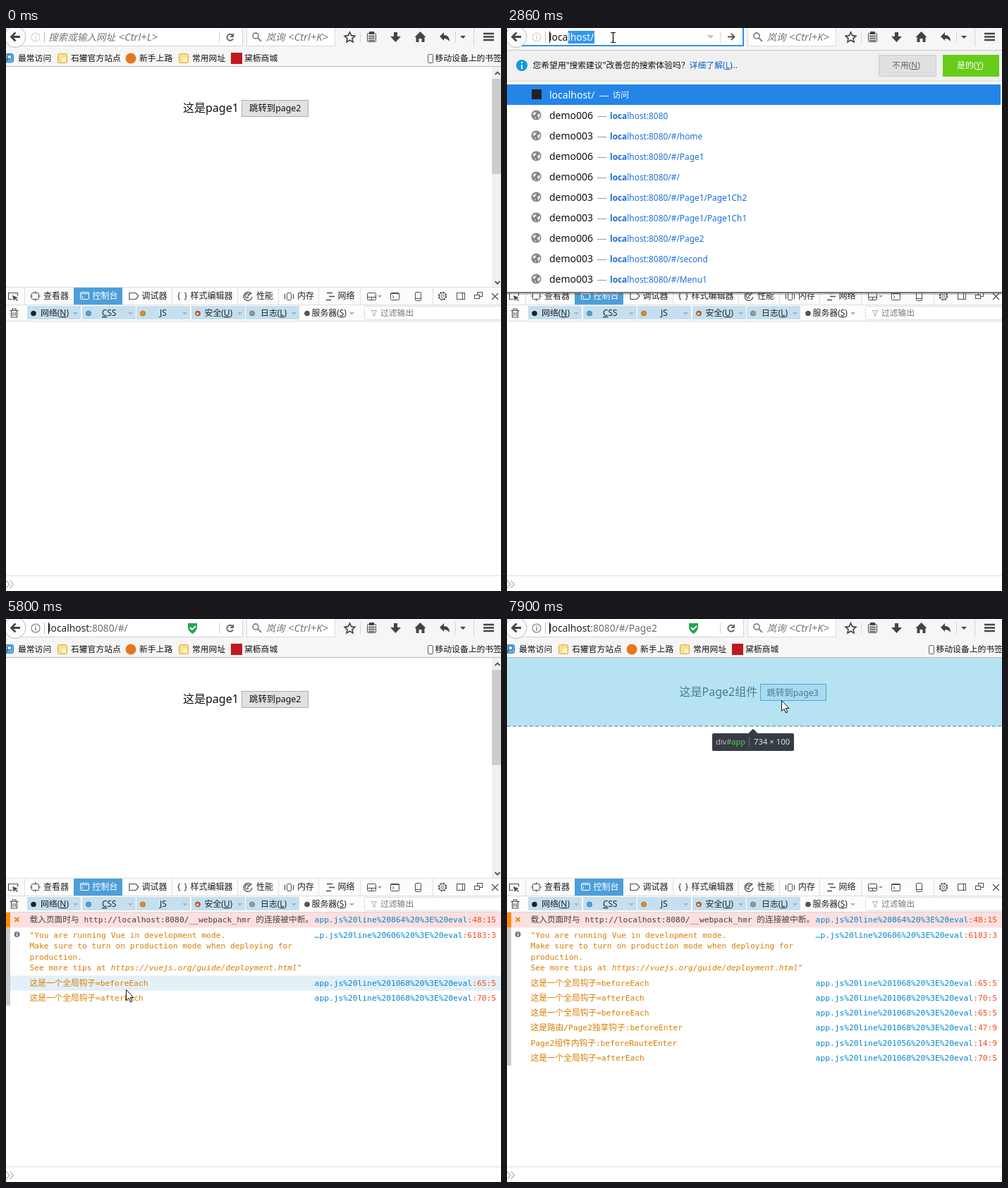
Write an HTML page that moves like this. It is 702 by 798 pixels and loops after 8000 ms.

```html
<!DOCTYPE html>
<html lang="zh-CN">
<head>
<meta charset="utf-8">
<style>
html, body { margin: 0; width: 100%; height: 100%; overflow: hidden; background: #fff }
svg { display: block; font-family: 'Noto Sans', 'Open Sans', 'Noto Sans CJK SC', 'Noto Sans CJK', sans-serif }
text { white-space: pre }
.mono { font-family: 'DejaVu Sans Mono', 'Noto Sans CJK SC', 'Noto Sans CJK', monospace }
</style>
</head>
<body>
<svg width="702" height="798" viewBox="0 0 702 798"><g id="base"></g><g id="live"></g></svg>
<script>
const LOOP = 8000;
const esc = s => s.replace(/&/g, '&amp;').replace(/</g, '&lt;');
const rect = (x, y, w, h, fill, extra = '') => `<rect x="${x}" y="${y}" width="${w}" height="${h}" fill="${fill}" ${extra}/>`;
const box = (x, y, w, h, fill, line, r = 0) => rect(x + .5, y + .5, w - 1, h - 1, fill, `stroke="${line}" rx="${r}"`);
const disc = (x, y, r, fill, extra = '') => `<circle cx="${x}" cy="${y}" r="${r}" fill="${fill}" ${extra}/>`;
const path = (d, stroke, w = 1, fill = 'none') => `<path d="${d}" stroke="${stroke}" stroke-width="${w}" fill="${fill}"/>`;
const fillPath = (d, fill) => `<path d="${d}" fill="${fill}"/>`;
// baselines sit on whole pixels to keep the text crisp
const raw = (x, y, body, size = 11.8, fill = '#222', extra = '') => `<text x="${x}" y="${Math.floor(y)}" font-size="${size}" fill="${fill}" ${extra}>${body}</text>`;
const text = (x, y, s, ...rest) => raw(x, y, esc(s), ...rest);
const span = (s, attrs) => `<tspan ${attrs}>${esc(s)}</tspan>`;
const vline = (x, y, h, c = '#d4d4d4') => rect(x, y, 1, h, c);
const caretDown = (x, y, w, fill) => fillPath(`M${x - w} ${y}h${2 * w}l${-w} ${w}z`, fill);
const cjk = s => esc(s).replace(/[\u3000-\u9fff]+/g, m => `<tspan font-size="11.7">${m}</tspan>`);
const hint = (x, label, keyX, keys) => text(x, 18, label, 13.6, '#777', 'font-style="italic"')
  + text(keyX, 18, keys, 14.8, '#777', 'font-style="italic"');

function toolbar() {
  const ink = '#444';
  const folder = x => box(x, 36, 14, 14, '#fbe08a', '#d9a93c', 2) + rect(x + 6, 42, 6, 6, '#fff3c4');
  return rect(0, 0, 702, 54, '#f6f6f6') + rect(0, 54, 702, 1, '#b9b9b9')
    + box(341, -2, 126, 28, '#fff', '#dadada')
    + disc(354, 11, 4, 'none', 'stroke="#8a8a8a" stroke-width="1.8"') + path('M357 14l5 5', '#8a8a8a', 2.2)
    + hint(368.5, '岚询', 400, '<Ctrl+K>')
    + path('M487.5 6l2.2 4.7 5.1.6-3.8 3.5 1 5.1-4.5-2.6-4.5 2.6 1-5.1-3.8-3.5 5.1-.6z', ink, 1.7)
    + vline(502, 5, 16) + box(512, 7, 13, 13, 'none', ink, 1) + rect(515, 5, 7, 4, ink)
    + path('M514 11.5h9M514 14.5h9M514 17.5h9', ink, 1.3)
    + fillPath('M550 6h5v6h5l-7.5 8-7.5-8h5z', ink)
    + fillPath('M587.5 5l8 8h-2v7h-4v-5h-4v5h-4v-7h-2z', ink)
    + fillPath('M615 12l6-6v4q8 0 8 9q-3-4-8-4v3z', ink)
    + vline(637, 5, 16) + caretDown(648, 11, 4, ink) + vline(663, 0, 26)
    + path('M677 8h15M677 12.5h15M677 17h15', ink, 2.6)
    + box(-3, 36, 14, 13, '#63aee8', '#2f7fc4', 2) + disc(5, 41, 3, '#dff0ff', 'stroke="#245d94"') + path('M3 43l-3 4', '#245d94', 1.5)
    + folder(73) + folder(245) + disc(177, 43, 7.5, '#e8761c') + rect(319, 35, 16, 16, '#c1191f')
    + [[17, '最常访问'], [92, '石獾官方站点'], [189, '新手上路'], [264, '常用网址'], [338, '黛枥商城'], [608.5, '移动设备上的书签']]
      .map(([x, s]) => text(x, 47, s, 11.8, '#111')).join('')
    + box(598, 37, 8, 13, '#e8e8e8', '#666', 1) + rect(600, 39, 4, 8, '#fff');
}

function devtools() {
  const ink = '#4a4d52';
  const tabs = [[53, '查看器'], [122.5, '控制台'], [192.5, '调试器'], [261.5, '样式编辑器'], [355, '性能'], [413, '内存'], [470.5, '网络']];
  const filters = [[30, 49, '网络', 'N', '#222'], [108, 136, 'CSS', '', '#47a3e6'], [185, 218, 'JS', '', '#e88a22'],
    [263, 281.5, '安全', 'U', '#dd5a2a'], [340, 361, '日志', 'L', '#999'], [418, 433.5, '服务器', 'S', '#555']];
  const under = s => span(s, 'text-decoration="underline"');
  return rect(0, 367, 702, 49, '#fcfcfc') + rect(0, 367, 702, 1, '#e0e0e0') + rect(0, 392, 702, 1, '#dcdcdc') + rect(0, 415, 702, 1, '#d8d8d8')
    + rect(96, 368, 69, 24, '#4c9ed9')
    + [26, 235, 328, 386, 443, 502, 605].map(x => vline(x, 368, 24, '#e0e0e0')).join('')
    + tabs.map(([x, s], i) => text(x, 384, s, 12, i == 1 ? '#fff' : '#222')).join('')
    + path('M9 384.5h-5.5v-9h13v4', ink, 1.2) + fillPath('M9 379l8 3-3 1 3 3-1 1-3-3-2 3z', ink)
    + box(36, 375, 11, 10, 'none', ink, 1) + path('M41.5 373v3M41.5 384v3M34 380h3M46 380h3', ink)
    + box(105, 374, 13, 11, 'none', '#fff', 1) + path('M105 376.5h13M107 379l2 2-2 2', '#fff')
    + path('M175 375.5h9l4 4.5-4 4.5h-9z', ink, 1.2)
    + path('M247 375q-2 0-2 2v2l-1 1 1 1v2q0 2 2 2M253 375q2 0 2 2v2l1 1-1 1v2q0 2-2 2', ink, 1.2)
    + path('M348 377a6 6 0 1 0 1 4M345 379a3 3 0 1 0-1 3M342 381l6-6', ink, 1.2)
    + box(398, 375, 7, 11, 'none', ink, 1) + path('M395.5 377v7M407.5 377v7', ink, 1.2)
    + path('M455 375.5h8M458 380.5h8M454 385.5h7', ink, 1.3)
    + box(512, 375, 13, 11, 'none', ink, 1) + path('M512 381.5h13M518.5 381v5', ink) + caretDown(530, 379, 3, '#999')
    + box(545, 375, 13, 11, 'none', ink, 1) + path('M545 376.5h13M548 379l2 2-2 2', ink)
    + box(580, 374, 9, 13, 'none', ink, 1) + path('M580 383.5h9', ink)
    + disc(619, 380, 5, 'none', `stroke="${ink}" stroke-width="2.5" stroke-dasharray="2.4 1.5"`) + disc(619, 380, 4.5, '#fcfcfc', 'stroke="#666"') + disc(619, 380, 2, 'none', 'stroke="#666"')
    + box(639, 375, 12, 10, 'none', ink) + vline(647, 375, 10, ink)
    + box(668, 374, 8, 7, 'none', ink) + box(664, 378, 8, 6, '#fcfcfc', ink)
    + path('M689 376l9 9M698 376l-9 9', ink, 1.2)
    + path('M5.5 400.5h12M9 400v-2h5v2M7.5 401v9h8v-9M10 403v5M13 403v5', ink, 1.2)
    + filters.map(([x, tx, s, key, dot], i) => (i < 5 ? rect(x, 394, 76, 19, '#c4dfef') : '')
      + disc(x + 9, 404.5, 3.6, dot, 'stroke="#000" stroke-opacity=".3"') + caretDown(x + (i < 5 ? 68.5 : 72.5), 403, 3.5, '#a5b2ba')
      + raw(tx, 408, key ? `${s}(${under(key)})` : under(s[0]) + s.slice(1), 11.9)).join('')
    + disc(271.5, 405, 1.6, '#fff0d0')
    + box(508, 394, 196, 20, '#fff', '#ddd', 2) + path('M518.5 400.5h7l-2.5 4v4l-2-1v-3z', '#aaa') + text(531, 408, '过滤输出', 11.8, '#777')
    + rect(0, 416, 702, 382, '#fff') + rect(0, 776, 702, 1, '#dedede')
    + path('M0 783l5 5.5-5 5.5M5.5 783l5 5.5-5 5.5', '#b5b5b5', 1.2);
}

function addressBar(t) {
  const focus = t >= 1230 && t < 3780, strong = t >= 1300 && t < 3700, loaded = t >= 4010, typed = t >= 2310;
  let s = rect(20, 0, 316, 26, '#f6f6f6') + box(20, -2, 316, 28, '#fff', strong ? '#2f91e5' : focus ? '#86bdea' : '#d2d2d2')
    + (strong ? rect(20, 24, 315, 1, '#2f91e5') + rect(334, 0, 1, 25, '#2f91e5') : '')
    + disc(13, 12.5, 15, '#fbfbfb', 'stroke="#b9b9b9"') + path('M20 12.5h-12M13.5 6.5l-6 6 6 6', '#444', 2.8);
  const tone = loaded ? '#777' : '#d0d0d0';
  s += disc(42, 13, 6, 'none', `stroke="${tone}" stroke-width="1.1"`) + rect(41.3, 12, 1.4, 4.5, tone) + rect(41.3, 9.5, 1.4, 1.5, tone)
    + vline(54, 5, 16, '#bbb') + vline(302, 5, 16);
  if (!typed) s += hint(60, '搜索或输入网址', 159.5, '<Ctrl+L>');
  else if (t < 3240) {
    const n = t < 2550 ? 1 : t < 2700 ? 2 : t < 2780 ? 3 : 4, x = [0, 63.6, 72, 78.8, 86.6][n];
    s += rect(x, 4, 124 - x, 18, '#3297f0') + raw(60, 18, span('localhost/'.slice(0, n), 'fill="#111"') + span('localhost/'.slice(n), 'fill="#fff"'), 13.8);
  } else {
    const tail = t < 4010 ? ':8080' : t < 7820 ? ':8080/#/' : ':8080/#/Page2';
    s += raw(60, 18, span('localhost', 'fill="#222"') + span(tail, 'fill="#707070"'), 13.8);
  }
  if (t >= 1230) s += vline(60, 5, 16, '#000');
  if (focus || (typed && !loaded)) s += caretDown(288.5, 10, 5, '#c4c4c4');
  if (loaded) s += fillPath('M258 6h13v6q-1 6-6.5 9q-5.5-3-6.5-9z', '#23a455') + path('M261 12l3 3 5-5', '#fff', 1.8);
  if (typed && t < 3700) s += path('M313 12.5h9M318 8l4.5 4.5-4.5 4.5', '#555', 1.8);
  else if (typed && !loaded) s += path('M314 9l8 8M322 9l-8 8', '#666', 2);
  else s += path('M321 10a4.5 4.5 0 1 0 1 5', '#666', 1.9) + fillPath('M323 7v6h-6z', '#666');
  return s;
}

function page(t) {
  if (t >= 7820) return page2(t >= 7900);
  const look = t >= 7660 ? ['#cce4f7', '#005499'] : t >= 7190 ? ['#e5f1fb', '#0078d7'] : ['#e1e1e1', '#adadad'];
  return rect(0, 55, 702, 312, '#fff') + text(251, 119, '这是page1', 16, '#111')
    + box(334, 102, 95, 24, ...look) + text(345, 118, '跳转到page2', 12.4, '#111')
    + rect(689, 55, 13, 312, '#f0f0f0') + rect(689, 72, 13, 135, '#cdcdcd')
    + path('M693.5 66l3.5-3.5 3.5 3.5M693.5 359l3.5 3.5 3.5-3.5', '#555', 1.8)
    + (t >= 3700 && t < 4010 ? box(-2, 347, 218, 22, '#ececec', '#b5b5b5') + text(-2, 362, '等待 localhost...', 11.8) : '');
}

function page2(lit) {
  const ink = lit ? '#467d94' : '#111';
  return rect(0, 55, 702, 312, '#fff') + (lit ? rect(0, 55, 702, 97, '#b7e2f1') : '')
    + text(244.5, 109, '这是Page2组件', 16, ink)
    + box(359, 92, 94, 24, lit ? '#a9daf0' : '#e5f1fb', lit ? '#4aa9de' : '#0078d7') + text(368.5, 109, '跳转到page3', 12.4, ink)
    + (!lit ? '' : `<path d="M0 152h702" stroke="#48819b" stroke-dasharray="5 3"/>`
      + rect(291, 162, 116, 25, '#363c46', 'rx="2"') + fillPath('M342 162.5l7-7 7 7z', '#363c46')
      + raw(296, 178, span('div', 'fill="#e3a9dc"') + span('#app', 'fill="#5ecb4e"'), 11)
      + vline(343, 167, 14, '#6a717c') + text(350, 178, '734 × 100', 11.3, '#e4e7ea'));
}

const SRC = 'app.js%20line%20';
const link = (y, id, place, head = SRC) => raw(695, y,
  span(`${head}${id}%20%3E%20eval`, 'fill="#0087ca"') + span(place, 'fill="#ee4b1c"'), 11.25, '#000', 'class="mono" text-anchor="end"');
const log = (x, y, s, color = '#d97e00') => raw(x, y, s, 11.25, color, 'class="mono"');
const HOOKS = [['这是一个全局钩子=beforeEach', 1068, ':65:5'], ['这是一个全局钩子=afterEach', 1068, ':70:5'],
  ['这是一个全局钩子=beforeEach', 1068, ':65:5'], ['这是路由/Page2独享钩子:beforeEnter', 1068, ':47:9'],
  ['Page2组件内钩子:beforeRouteEnter', 1056, ':14:9'], ['这是一个全局钩子=afterEach', 1068, ':70:5']];
const rowTop = i => 505.5 + 21.25 * i;

function logs(t) {
  if (t < 3780) return '';
  let s = rect(0, 416, 702, 21.5, '#fddfdf') + rect(0, 416, 6, 21.5, '#ff8a00')
    + path('M12.5 423l6 6M18.5 423l-6 6', '#f08a24', 2.2)
    + log(33.5, 430, cjk('载入页面时与 http://localhost:8080/__webpack_hmr 的连接被中断。'), '#444') + link(430, 864, ':48:15');
  if (t < 4160) return s;
  const count = t >= 7900 ? 6 : 2;
  let y = pointer(t).y;
  if (y < 416) y = pointer(t - 80).y;
  if (t > 4870 && y > 437.5) {
    const i = Math.floor((y - rowTop(0)) / 21.25);
    s += i < 0 ? rect(6, 437.5, 696, 67.5, '#e3f0f8') : i < count ? rect(6, rowTop(i), 696, 21.25, '#e3f0f8') : '';
  }
  s += rect(0, 437.5, 6, rowTop(count) - 437.5, '#cacaca')
    + disc(15.5, 447, 4, '#777') + rect(14.8, 446.5, 1.5, 3, '#fff') + rect(14.8, 444.3, 1.5, 1.3, '#fff')
    + ['"You are running Vue in development mode.', 'Make sure to turn on production mode when deploying for', 'production.']
      .map((line, i) => log(33.5, 452 + 15.6 * i, line)).join('')
    + log(33.5, 498, 'See more tips at ' + span('https://vuejs.org/guide/deployment.html', 'font-style="italic"') + '"')
    + link(452, 606, ':6183:3', '…p.js%20line%20');
  return s + HOOKS.slice(0, count).map(([msg, id, place], i) =>
    log(33.5, rowTop(i) + 14.5, cjk(msg)) + link(rowTop(i) + 14.5, id, place)).join('');
}

const HITS = [['006', ''], ['003', '/#/home'], ['006', '/#/Page1'], ['006', '/#/'], ['003', '/#/Page1/Page1Ch2'],
  ['003', '/#/Page1/Page1Ch1'], ['006', '/#/Page2'], ['003', '/#/second'], ['003', '/#/Menu1']];

function suggestions(t) {
  if (t < 2310 || t >= 3700) return '';
  const bold = t < 2390 ? 4 : t < 2700 ? 1 : t < 2860 ? 3 : 4, pick = t < 3240 ? 0 : 1;
  const ink = i => i == pick ? '#fff' : '#111', blue = i => i == pick ? '#fff' : '#1a6fd4';
  const dash = (x, y, i) => rect(x, y - 5, 13, 1, i == pick ? '#fff' : '#999');
  const access = (x, label, key, fill) => raw(x, 57, `${label}(${span(key, 'text-decoration="underline"')})`, 11.9, fill);
  let s = rect(0, 374, 702, 4, '#000', 'opacity=".2"') + rect(0, 31, 702, 345, '#fff') + rect(0, 374, 702, 2, '#777')
    + rect(0, 31, 702, 44, '#f0f0f0') + rect(0, 31, 702, 1, '#c8c8c8') + rect(0, 75, 702, 1, '#d5d5d5')
    + disc(21, 53, 8, '#159ade') + rect(20, 52, 2, 6, '#fff') + rect(20, 48, 2, 2, '#fff')
    + text(36.5, 57, '您希望用"搜索建议"改善您的搜索体验吗？', 11.8, '#111')
    + access(258.5, '详细了解', 'L', '#0b62c4') + text(317.5, 57, '...', 11.9, '#0b62c4')
    + box(527, 38, 82, 31, '#e0e0e0', '#cbcbcb', 1) + access(546, '不用', 'N', '#666')
    + rect(618, 38, 80, 31, '#66cc18', 'rx="1"') + access(638, '是的', 'Y', '#fff')
    + rect(0, 80 + 29 * pick, 700, 29, '#2385e8')
    + rect(35, 87, 14, 14, '#222') + text(60, 100, 'localhost/', 14, ink(0)) + dash(131, 101, 0) + text(149.5, 99, '访问', 11.8, blue(0));
  HITS.forEach(([id, tail], k) => {
    const i = k + 1, y = Math.floor(129 + 29.1 * k), url = 'localhost:8080' + tail;
    s += disc(41.5, y - 5.5, 7, '#858585') + fillPath(`M37 ${y - 9}l5-1-2 4-3 1zM43 ${y - 6}l4-2v4l-3 3zM38 ${y - 3}l3 1 0 2z`, '#e8e8e8')
      + text(60, y, 'demo' + id, 14, ink(i)) + dash(128, y + 1, i)
      + raw(146, y, span(url.slice(0, bold), 'font-weight="700"') + esc(url.slice(bold)), 11.9, blue(i));
  });
  return s;
}

// start time, step length, step count, end point, easing
const smooth = p => p * p * (3 - 2 * p), out = p => 1 - (1 - p) ** 2, linear = p => p;
const MOVES = [[210, 78, 11, 150, 13, smooth], [4870, 75, 3, 152, 459, linear], [5100, 83, 4, 170, 514, out],
  [5490, 1, 1, 170, 515, linear], [5800, 1, 1, 170, 525, linear], [5880, 1, 1, 169, 537, linear],
  [6410, 1, 1, 169, 536, linear], [6580, 80, 2, 256, 402, linear], [6740, 76, 7, 389, 115, out]];

function pointer(t) {
  let x = 625, y = 795;
  for (const [start, step, n, tx, ty, ease] of MOVES) {
    if (t < start) break;
    const p = ease(Math.min(n, Math.floor((t - start) / step) + 1) / n);
    x += (tx - x) * p;
    y += (ty - y) * p;
  }
  return { x: Math.round(x), y: Math.round(y) };
}

function cursor(t) {
  if (t < 210) return '';
  const { x, y } = pointer(t);
  const shape = y < 26 ? path('M-3 -6.5h2.5l1 1 1-1h2.5M.5 -6v13M-3 7.5h2.5l1-1 1 1h2.5', '#000', 1.2)
    : path('M.5 .5v15l3.5-3.2 2.5 5.7 2.2-1-2.4-5.5h4.5z', '#111', 1, '#fff');
  return `<g transform="translate(${x} ${y})">${shape}</g>`;
}

const live = document.getElementById('live');
let shown;
document.getElementById('base').innerHTML = toolbar() + devtools();

function draw(now) {
  const t = now % LOOP;
  const next = [page, logs, suggestions, addressBar, cursor].map(part => part(t)).join('');
  if (next !== shown) live.innerHTML = shown = next;
  requestAnimationFrame(draw);
}
draw(0);
</script>
</body>
</html>
```
